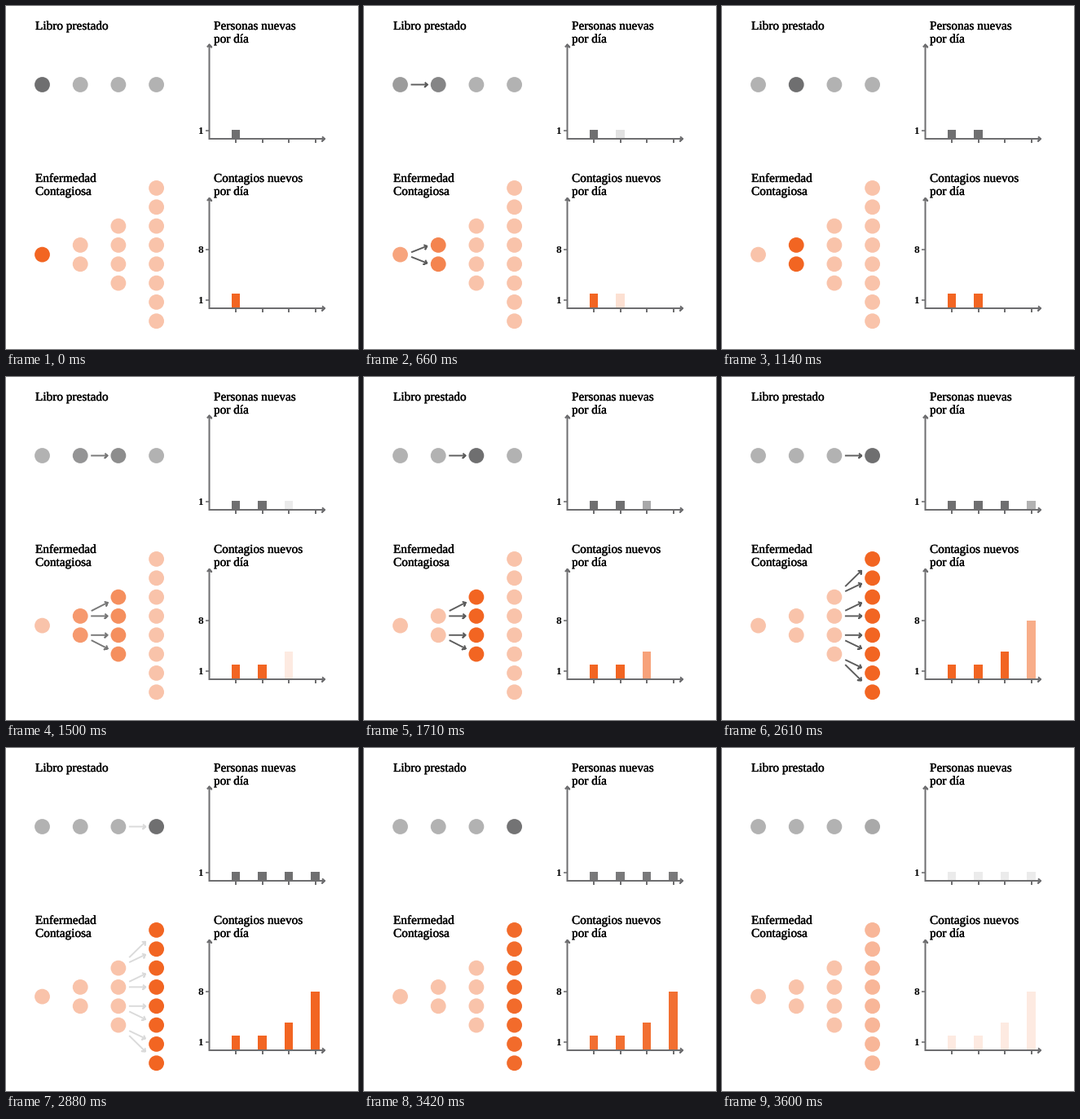
Recreate the animation shown at these times as a matplotlib script. Size 432 by 421 pixels, loop 3630 ms.

```python
import numpy as np
import matplotlib.pyplot as plt
from matplotlib import patheffects
from matplotlib.animation import FuncAnimation
from matplotlib.colors import to_rgb
from matplotlib.patches import Circle, Rectangle

W, H, DPI = 432, 421, 100
FRAMES, INTERVAL = 121, 30
PX = 72 / DPI

GRAY, GRAY_PALE = "#6f6f70", "#b2b2b2"
ORANGE, ORANGE_PALE = "#f26522", "#f9c3aa"
AXIS, ARROW = "#6e6e70", "#5c5c5c"

COL_X = 44.5 + 46.7 * np.arange(4)
BAR_X = 282 + 32.5 * np.arange(4)
ROW, RADIUS, BAR_W = 23.33, 9.4, 10.6
BOOK_Y, ILL_Y = 96.5, 305.1

# First frame of each step, and how many frames later its arrows are gone
STEPS = [(17, 21), (46, 19), (77, 21)]
RESET = 114

fig = plt.figure(figsize=(W / DPI, H / DPI), dpi=DPI, facecolor="white")
ax = fig.add_axes([0, 0, 1, 1])
ax.set_xlim(0, W)
ax.set_ylim(H, 0)
ax.axis("off")


def ramp(value):
    return min(max(value, 0.0), 1.0)


def mix(a, b, t):
    a, b = np.array(to_rgb(a)), np.array(to_rgb(b))
    return tuple(a + (b - a) * t)


def line(xs, ys, color=AXIS, width=2.0, z=3):
    return ax.plot(xs, ys, color=color, lw=width * PX, zorder=z,
                   solid_capstyle="butt", solid_joinstyle="round")[0]


def arrow(x0, y0, x1, y1, color=ARROW, width=1.9, head=4.2, z=4):
    turn = np.arctan2(y1 - y0, x1 - x0) + np.pi + np.radians([-42, 42])
    hx, hy = x1 + head * np.cos(turn), y1 + head * np.sin(turn)
    return line([x0, x1, hx[0], x1, hx[1]], [y0, y1, hy[0], y1, hy[1]],
                color, width, z)


def label(x, y, text, size=15.3, weight="normal", ha="left", bold=0.25):
    t = ax.text(x, y, text, family="Liberation Serif", fontsize=size * PX,
                weight=weight, color="black", ha=ha, va="baseline")
    if bold:
        t.set_path_effects([patheffects.withStroke(linewidth=bold,
                                                   foreground="black")])


def chart(top, base, ticks):
    arrow(249.5, base + 1, 249.5, top, AXIS, 2, 4)
    arrow(249, base, 391, base, AXIS, 2, 4)
    for x in BAR_X:
        line([x, x], [base, base + 5])
    for y, text in ticks:
        line([244.5, 249.5], [y, y], width=1.6)
        label(242.5, y + 4, text, 13.2, "bold", "right", 0)


def bars(base, tops, color):
    return [ax.add_patch(Rectangle((x - BAR_W / 2, top), BAR_W, base - top,
                                   fc=color, lw=0, zorder=2))
            for x, top in zip(BAR_X, tops)]


def dots(x, ys):
    return [ax.add_patch(Circle((x, y), RADIUS, lw=0, zorder=2)) for y in ys]


def branch(x, y, dx0, dy0, dx1, dy1):
    return arrow(x + dx0, y + dy0, x + dx1, y + dy1)


def step_arrows(k):
    x = COL_X[k]
    out = [branch(x, BOOK_Y, 13, 0, 33.3, 0)]
    # Offsets for the upper half, mirrored below the centre line
    upper = [
        [(13.5, -2.8, 32.7, -10.4)],
        [(13.5, -18, 33.5, -28.2), (13, -11.7, 33.3, -11.7)],
        [(13.3, -48, 33, -67.3), (13.3, -42, 33, -51.4),
         (13.3, -18.3, 33, -27.8), (13, -11.7, 33.3, -11.7)],
    ][k]
    for dx0, dy0, dx1, dy1 in upper:
        for side in (1, -1):
            out.append(branch(x, ILL_Y, dx0, side * dy0, dx1, side * dy1))
    return out


label(36, 29, "Libro prestado")
label(255, 29, "Personas nuevas")
label(255, 45, "por día")
label(36, 216, "Enfermedad")
label(36, 232, "Contagiosa")
label(255, 216, "Contagios nuevos")
label(255, 232, "por día")

chart(47.5, 163, [(153, "1")])
chart(236, 371, [(299, "8"), (361, "1")])

book_bars = bars(162.5, [152] * 4, GRAY)
ill_bars = bars(370.5, [353.2, 353.2, 337.2, 299.2], ORANGE)
book_dots = [dots(x, [BOOK_Y]) for x in COL_X]
ill_dots = [dots(x, ILL_Y + ROW * (np.arange(2 ** k) - (2 ** k - 1) / 2))
            for k, x in enumerate(COL_X)]
arrows = [step_arrows(k) for k in range(3)]


def update(i):
    glow = np.array([1.0, 0, 0, 0])
    bar = np.array([1.0, 0, 0, 0])
    for k, (start, end) in enumerate(STEPS):
        n = i - start
        swap = ramp((n + 1) / 9)
        glow[k] -= swap
        glow[k + 1] = swap
        bar[k + 1] = ramp((n - 2) / 15)
        seen = ramp((n + 1) / 6) * ramp((end - n) / (end - 12))
        for a in arrows[k]:
            a.set_alpha(seen)
    if i >= RESET:
        left = 1 - (i - RESET + 0.5) / 7.5
        glow[3] *= left
        bar *= left
    for k in range(4):
        for d in book_dots[k]:
            d.set_facecolor(mix(GRAY_PALE, GRAY, glow[k]))
        for d in ill_dots[k]:
            d.set_facecolor(mix(ORANGE_PALE, ORANGE, glow[k]))
        book_bars[k].set_alpha(bar[k])
        ill_bars[k].set_alpha(bar[k])
    return []


anim = FuncAnimation(fig, update, frames=FRAMES, interval=INTERVAL,
                     repeat=True, repeat_delay=0, blit=False)
plt.show()
```
